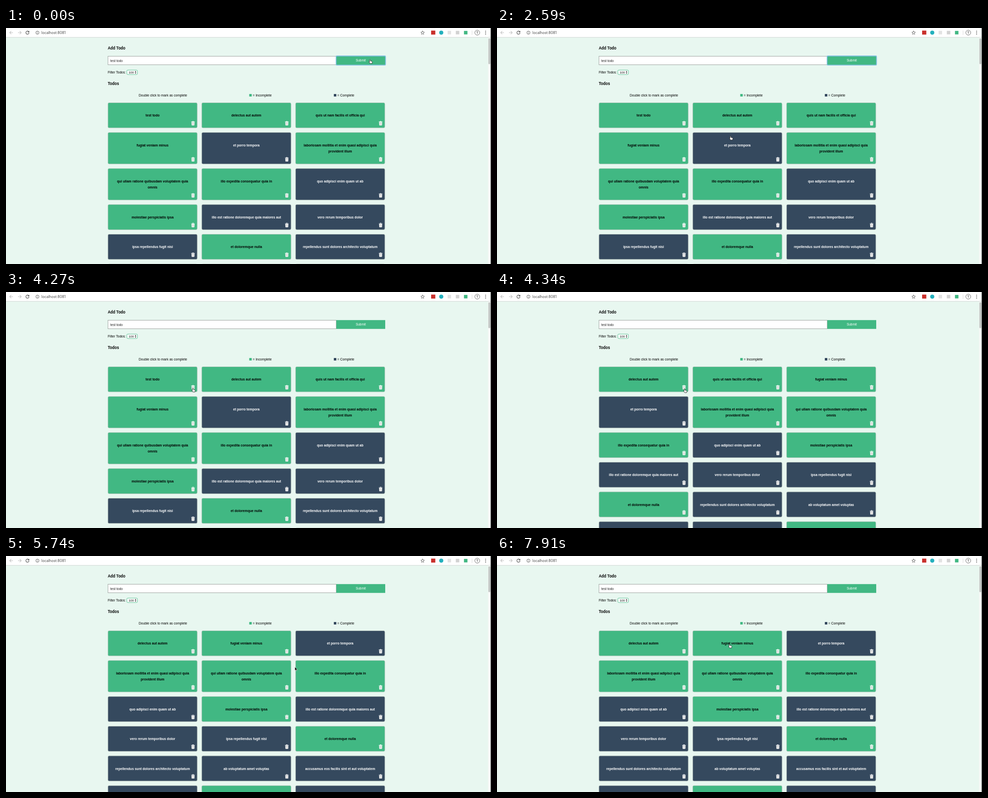
An HTML page for the animation above (8000 ms loop, 972 px wide and 472 px high).

```html
<!DOCTYPE html>
<html lang="en">
<head>
<meta charset="utf-8">
<title>Todo list</title>
<style>
  html, body { margin: 0; width: 100%; height: 100%; overflow: hidden; background: #e8f7f0; }
  svg { display: block; width: 972px; height: 472px; font: 8.08px "Liberation Sans", Arial, sans-serif; }
  .bold { font-weight: bold; }
  .head { font-weight: bold; font-size: 9.35px; }
  .mid { text-anchor: middle; }
  .small { font-size: 6.5px; }
  .url { font: 7.1px Inter, sans-serif; fill: #444; }
  .line { fill: none; stroke: #555; stroke-width: 1.1; }
  .faint { stroke: #c4c4c4; }
</style>
</head>
<body>
<svg viewBox="0 0 972 472">
  <defs>
    <g id="trash">
      <path fill="#fff" d="M-3.6-3.4H-1.6L-1.1-4.3H1.1L1.6-3.4H3.6V-2.5H-3.6ZM-3.1-2H3.1L2.8 3.6Q2.7 4.3 2 4.3H-2Q-2.7 4.3-2.8 3.6Z"/>
      <path stroke="#000" stroke-opacity=".35" stroke-width=".6" d="M-1.5-.9V3.2M0-.9V3.2M1.5-.9V3.2"/>
    </g>
  </defs>

  <rect width="972" height="472" fill="#e8f7f0"/>
  <rect width="972" height="18.5" fill="#fff"/>
  <path d="M0 18.7H972" stroke="#ccd2cf" stroke-width=".8"/>
  <path class="line faint" d="M14 9.3H7.5M10.5 6.2L7.4 9.3L10.5 12.4M24 9.3H30.5M27.5 6.2L30.6 9.3L27.5 12.4"/>
  <path class="line" d="M45.4 7.1A3.2 3.2 0 1 0 46.2 9.9"/>
  <path fill="#555" d="M46.6 5.4V8.8H43.2Z"/>
  <g class="line" style="stroke-width:.8">
    <circle cx="63" cy="9.3" r="3.2"/>
    <path d="M63 8.7V11.2M63 7.1V7.9"/>
    <path d="M835 5.7L836 8.2L838.6 8.4L836.6 10.1L837.2 12.7L835 11.3L832.8 12.7L833.4 10.1L831.4 8.4L834 8.2Z"/>
    <circle cx="944.5" cy="9.3" r="4.9"/>
    <path d="M942.7 7.4H946.3M944.5 7.4V11.7"/>
  </g>
  <text class="url" x="71" y="11.9">localhost:8081</text>
  <rect x="852" y="5.2" width="8.4" height="8" fill="#c9302c"/>
  <circle cx="872.3" cy="9.3" r="4.1" fill="#23b0bd"/>
  <rect x="885" y="5.7" width="7" height="7" fill="#e3e3e3"/>
  <rect x="901.5" y="5.7" width="7" height="7" fill="#d2d2d2"/>
  <rect x="917.8" y="5.8" width="7" height="7" fill="#41b883"/>
  <path d="M934 5V14" stroke="#ddd"/>
  <g fill="#555"><circle cx="961.2" cy="6.3" r=".9"/><circle cx="961.2" cy="9.3" r=".9"/><circle cx="961.2" cy="12.3" r=".9"/></g>
  <rect x="966" y="19" width="5" height="453" fill="#f7faf8"/>
  <rect x="966.8" y="20.5" width="3.8" height="52" rx="1.9" fill="#bfc3c1"/>
  <rect x="971" width="1" height="472" fill="#5c605e"/>

  <rect x="204.3" y="56.5" width="457.5" height="17" fill="#fff" stroke="#9da3a0" stroke-width=".9"/>
  <text class="small" x="209" y="67.6" fill="#222">test todo</text>
  <rect x="662" y="56.2" width="98" height="17.6" fill="#41b883"/>
  <rect id="ring" x="661.6" y="55.9" width="99" height="18.3" rx="1.5" fill="none" stroke="#82bfe2" stroke-width="1.6"/>
  <text class="small mid" x="711" y="67.4" fill="#fff">Submit</text>
  <rect x="242.2" y="84.2" width="21.2" height="8.8" rx="2" fill="#fff" stroke="#41b883" stroke-width=".8"/>
  <text x="246" y="90.8" font-size="6">100</text>
  <path fill="#333" d="M258 88L259.6 85.8L261.2 88ZM258 89.2L259.6 91.4L261.2 89.2Z"/>
  <rect x="487.5" y="132" width="5" height="5" fill="#41b883"/>
  <rect x="657" y="132" width="5" height="5" fill="#35495e"/>
  <g id="labels"></g>
  <g id="cards"></g>
  <path id="cursor"/>
</svg>
<script>
const $ = id => document.getElementById(id);
const LOOP = 8000, BLUR = 4200, DELETE_1 = 4340, DELETE_2 = 5530;
const LINE = 12.7, GAP = 8.5, CARD_W = 179.5;

// A leading * marks a completed todo, | breaks the line
const todos = `test todo
delectus aut autem
quis ut nam facilis et officia qui
fugiat veniam minus
*et porro tempora
laboriosam mollitia et enim quasi adipisci quia|provident illum
qui ullam ratione quibusdam voluptatem quia|omnis
illo expedita consequatur quia in
*quo adipisci enim quam ut ab
molestiae perspiciatis ipsa
*illo est ratione doloremque quia maiores aut
*vero rerum temporibus dolor
*ipsa repellendus fugit nisi
et doloremque nulla
*repellendus sunt dolores architecto voluptatum
*ab voluptatum amet voluptas
*accusamus eos facilis sint et aut voluptatem
*quo laboriosam deleniti aut qui
dolorum est consequatur ea mollitia in culpa
*molestiae ipsa aut voluptatibus pariatur dolor`.split('\n').map(s => ({
  done: s[0] === '*',
  lines: s.replace('*', '').split('|')
}));

// The page is set in a narrow face
const narrow = (text, x, y, cls = '', fill = '#000') =>
  `<text class="${cls}" transform="translate(${x} ${y}) scale(.82 1)" fill="${fill}">${text}</text>`;

$('labels').innerHTML =
  narrow('Add Todo', 204, 43.3, 'head') +
  narrow('Filter Todos:', 204, 91) +
  narrow('Todos', 204, 114.4, 'head') +
  narrow('Double click to mark as complete', 266, 137.3) +
  narrow('= Incomplete', 494.5, 137.3) +
  narrow('= Complete', 664, 137.3);

function layout(list) {
  const boxes = [];
  let y = 149.2;
  for (let i = 0; i < list.length; i += 3) {
    const row = list.slice(i, i + 3);
    const h = 38.2 + LINE * Math.max(...row.map(todo => todo.lines.length));
    row.forEach((todo, col) => boxes.push({ ...todo, x: 204 + col * (CARD_W + GAP), y, h }));
    y += h + GAP;
  }
  return boxes;
}

const card = ({ x, y, h, done, lines }) =>
  `<rect x="${x + .3}" y="${y + .3}" width="${CARD_W - .6}" height="${h - .6}" rx="2.4"
    fill="${done ? '#35495e' : '#41b883'}" stroke="#b9c4be" stroke-width=".7"/>` +
  lines.map((s, i) => narrow(s, x + CARD_W / 2, y + 28 + i * LINE, 'bold mid', done ? '#fff' : '#000')).join('') +
  `<use href="#trash" x="${x + CARD_W - 8.7}" y="${y + h - 9.6}"/>`;

const views = [todos, todos.slice(1), todos.filter((_, i) => i !== 0 && i !== 2)].map(layout);

// Pointer stops: time, x, y
const stops = [
  [0, 729.5, 63], [350, 729.5, 63], [1120, 330, 174], [1470, 321, 179],
  [1960, 440, 190], [2170, 440, 190], [2590, 468, 216], [3220, 405, 204],
  [3500, 400, 202], [3710, 374.5, 192], [4270, 374.5, 192], [4340, 376, 193.3],
  [4620, 376, 193.3], [5320, 562.5, 191], [5530, 562.5, 191], [5740, 579, 222],
  [6020, 588, 236], [6160, 588, 236], [6930, 466, 176], [LOOP, 466, 176]
];
const HAND = 'M-.9 .7Q0-.6.9.7V2.9L3.8 3.6Q4.9 4 4.6 5.4L4 8H.2L-2 5Q-2.1 3.9-.9 4.5Z';
const ARROW = 'M0 0V7L1.6 5.6L2.8 8L3.9 7.5L2.8 5.2H5Z';

function pointerAt(t) {
  const i = stops.findIndex(s => s[0] > t);
  const [t0, x0, y0] = stops[i - 1], [t1, x1, y1] = stops[i];
  const p = (t - t0) / (t1 - t0), k = p * p * (3 - 2 * p);
  return [x0 + (x1 - x0) * k, y0 + (y1 - y0) * k];
}

let shown = -1;
function draw() {
  const t = performance.now() % LOOP;
  const view = (t >= DELETE_1) + (t >= DELETE_2);
  if (view !== shown) {
    $('cards').innerHTML = views[view].map(card).join('');
    shown = view;
  }
  $('ring').setAttribute('visibility', t < BLUR ? 'visible' : 'hidden');

  const [x, y] = pointerAt(t);
  const inside = b => x > b.x && x < b.x + (b.w || CARD_W) && y > b.y && y < b.y + b.h;
  const hand = inside({ x: 662, y: 56, w: 98, h: 18 }) || views[view].some(inside);
  const cursor = $('cursor');
  cursor.setAttribute('d', hand ? HAND : ARROW);
  cursor.setAttribute('fill', hand ? '#fff' : '#000');
  cursor.setAttribute('stroke', hand ? '#222' : '#fff');
  cursor.setAttribute('stroke-width', hand ? .8 : .5);
  cursor.setAttribute('transform', `translate(${x} ${y})`);
  requestAnimationFrame(draw);
}
draw();
</script>
</body>
</html>
```
